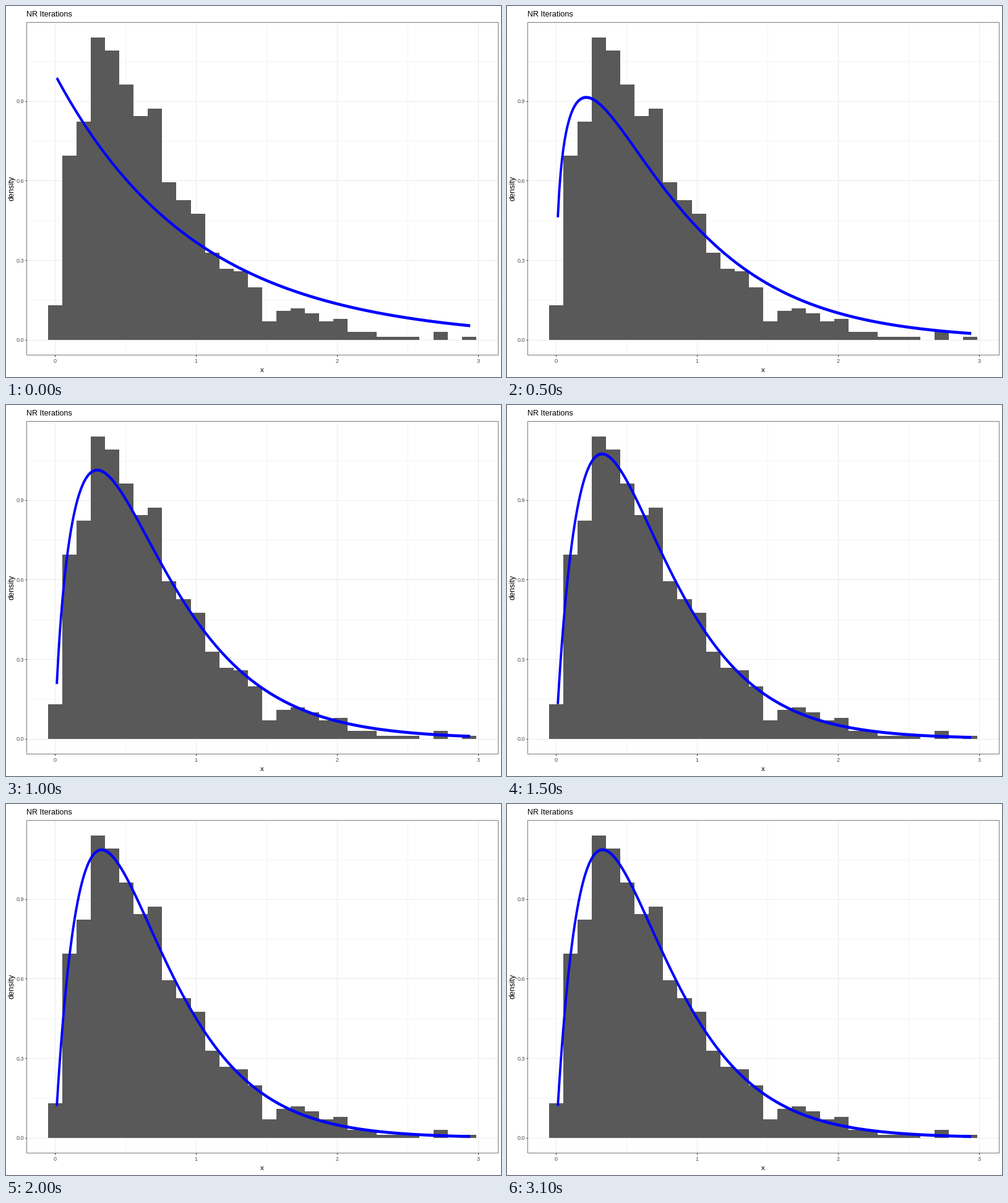
These frames come from a looping animation (800 by 600 pixels, 3.5 s). A matplotlib script:

```python
import math

import numpy as np
import matplotlib.pyplot as plt
from matplotlib.animation import FuncAnimation
from matplotlib.patches import Polygon, Rectangle

W, H, DPI = 800, 600, 100
PX = 72 / DPI                      # points per pixel
X0, Y0 = 79.3, 539.7               # pixel position of the data origin
SX, SY = 227.97, 428.7             # pixels per data unit
LEFT, RIGHT, TOP, BOTTOM = 33.4, 794.7, 26.4, 563.9
SQUEEZE, HALF_PEN = 0.8, 2.4       # the pen is narrower across than down

COUNTS = np.array([13, 70, 83, 115, 110, 97, 85, 88, 60, 53,
                   48, 33, 27, 26, 20, 7, 11, 12, 10, 7,
                   8, 3, 3, 1, 1, 1, 0, 3, 0, 1])
BIN = 0.10124
MEAN, MEAN_LOG = 0.675, -0.670     # sufficient statistics of the sample
STEPS = 5


def px(x):
    return X0 + SX * x


def py(y):
    return Y0 - SY * y


def digamma(a):
    shift = sum(1 / (a + k) for k in range(8))
    a += 8
    return math.log(a) - 1 / (2 * a) - 1 / (12 * a**2) + 1 / (120 * a**4) - shift


def trigamma(a):
    shift = sum(1 / (a + k) ** 2 for k in range(8))
    a += 8
    return 1 / a + 1 / (2 * a**2) + 1 / (6 * a**3) - 1 / (30 * a**5) + shift


def newton_fit(steps):
    """Shape and rate of a gamma fit after some Newton-Raphson steps."""
    shape, rate = 1.0, 1.0
    for _ in range(steps):
        score = [math.log(rate) - digamma(shape) + MEAN_LOG, shape / rate - MEAN]
        hessian = [[-trigamma(shape), 1 / rate], [1 / rate, -shape / rate**2]]
        d_shape, d_rate = np.linalg.solve(hessian, score)
        shape, rate = shape - d_shape, rate - d_rate
    return shape, rate


def gamma_density(x, shape, rate):
    return rate**shape / math.gamma(shape) * x ** (shape - 1) * np.exp(-rate * x)


def curve_outline(shape, rate):
    x = np.linspace(0.0125, 2.943, 300)
    u, v = px(x) / SQUEEZE, py(gamma_density(x, shape, rate))
    du, dv = np.gradient(u), np.gradient(v)
    length = np.hypot(du, dv)
    normal = HALF_PEN * np.column_stack([-dv, du]) / length[:, None]
    centre = np.column_stack([u, v])
    edge = np.vstack([centre + normal, (centre - normal)[::-1]])
    return edge * [SQUEEZE, 1]


fig = plt.figure(figsize=(W / DPI, H / DPI), dpi=DPI, facecolor="white")
ax = fig.add_axes([0, 0, 1, 1])
ax.set(xlim=(0, W), ylim=(H, 0))
ax.axis("off")


def line(xs, ys, color, width=1.0, z=1):
    ax.plot(xs, ys, color=color, lw=width * PX, zorder=z,
            solid_capstyle="butt")


def label(x, y, text, size, color="black", **kw):
    ax.text(x, y, text, fontsize=size * PX, color=color,
            family="Liberation Sans", **kw)


def grid(xs, ys, color):
    for x in xs:
        line([px(x)] * 2, [TOP, BOTTOM], color)
    for y in ys:
        line([LEFT, RIGHT], [py(y)] * 2, color)


grid([0.5, 1.5, 2.5], [0.15, 0.45, 0.75, 1.05], "#f5f5f5")
grid(range(4), [0, 0.3, 0.6, 0.9], "#ebebeb")

edges = px((np.arange(len(COUNTS) + 1) - 0.5) * BIN)
ax.stairs(py(COUNTS / (COUNTS.sum() * BIN)), edges, baseline=Y0,
          fill=True, color="#595959", lw=0, zorder=2)

curve = ax.add_patch(Polygon(curve_outline(1, 1), fc="#0000ff", lw=0, zorder=3))
ax.add_patch(Rectangle((LEFT, TOP), RIGHT - LEFT, BOTTOM - TOP, fill=False,
                       ec="#7a7a7a", lw=PX, zorder=4))

for x in range(4):
    line([px(x)] * 2, [BOTTOM, BOTTOM + 3], "#333333", z=5)
    label(px(x), 577.2, str(x), 9, "#4d4d4d", ha="center", va="baseline")
for y in (0, 0.3, 0.6, 0.9):
    line([LEFT - 2.6, LEFT], [py(y)] * 2, "#333333", z=5)
    label(29, py(y) + 3.5, f"{y:.1f}", 9, "#4d4d4d", ha="right", va="baseline")

label(33, 17.2, "NR Iterations", 12.6, va="baseline")
label(414, 591.5, "x", 11.5, ha="center", va="baseline")
label(10, 295, "density", 12.6, ha="center", va="center", rotation=90)


def update(frame):
    curve.set_xy(curve_outline(*newton_fit(min(frame, STEPS))))
    return [curve]


anim = FuncAnimation(fig, update, frames=STEPS + 2, interval=500,
                     repeat=True, repeat_delay=0)
plt.show()
```
